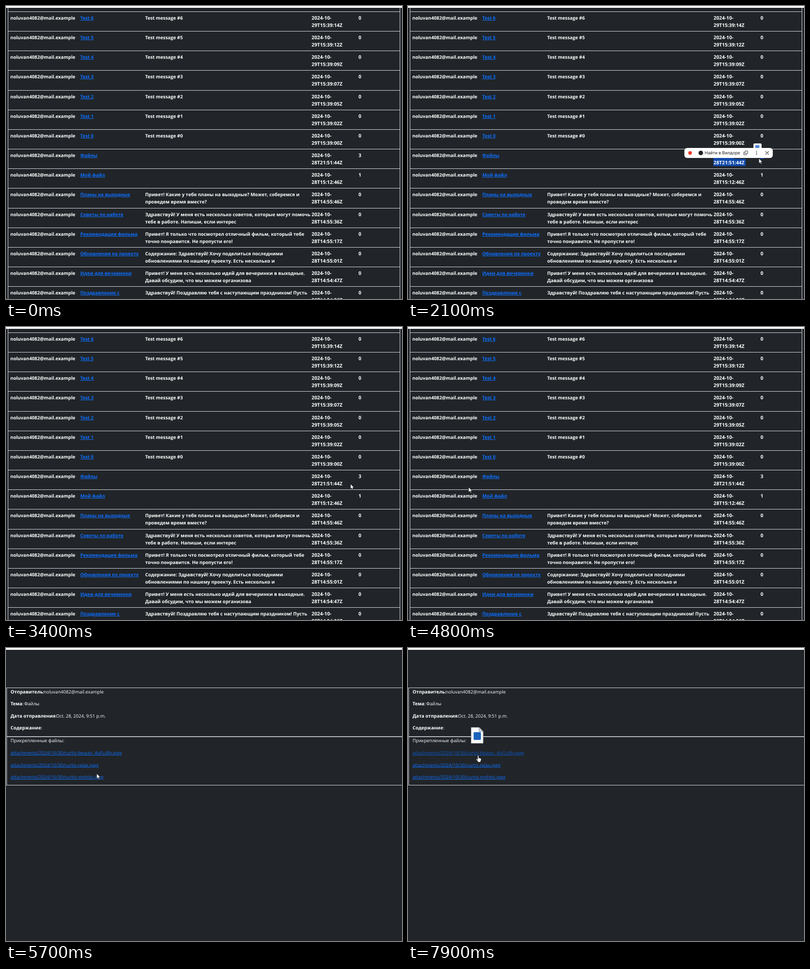
An HTML page for the animation above (8 s loop, 869 px wide and 644 px high).

```html
<!DOCTYPE html>
<html lang="ru">
<head>
<meta charset="utf-8">
<title>Почта</title>
<style>
html, body { margin: 0; width: 100%; height: 100%; overflow: hidden; background: #212529; }
svg { display: block; width: 869px; height: 644px; }
text { font: 10px "Open Sans", "Noto Sans", sans-serif; fill: #fff; text-rendering: geometricPrecision; white-space: pre; }
.bold { font-weight: 700; font-size: 10.2px; }
.date { font-weight: 700; font-size: 10.75px; }
.link { fill: #0d6efd; text-decoration: underline; }
.link.hover { fill: #0a58ca; }
.menu { font: 9.7px Roboto, "Noto Sans", sans-serif; fill: #222; }
.border { stroke: #dee2e6; fill: none; shape-rendering: crispEdges; }
.icon { stroke: #333; stroke-width: 1.1; fill: none; }
.pointer { fill: #fff; stroke: #111; stroke-width: .8; }
</style>
</head>
<body>
<svg viewBox="0 0 869 644">
  <rect width="869" height="644" fill="#212529"/>
  <g id="list">
    <g id="selection" fill="#0d47a8">
      <path d="M670 320h46v16h-46zM670 336h71v16h-71zM773 320h8v16h-8z"/>
    </g>
  </g>
  <g id="letter"></g>
  <rect width="869" height="4" fill="#fff"/>
  <rect id="progress" y="4" height="2" fill="#f6d32d"/>
  <g id="translate">
    <rect x="758" y="302" width="18" height="18" rx="3" fill="#f4f6f8"/>
    <rect x="762" y="306" width="9" height="9" fill="#5289d6"/>
  </g>
  <g id="popup">
    <rect x="606.5" y="312" width="194" height="22" rx="6" fill="#fff"/>
    <circle cx="619" cy="323" r="4" fill="#f33b28"/>
    <circle cx="642.5" cy="323" r="5" fill="#222"/>
    <text class="menu" x="651" y="326.3">Найти в Вилдоре</text>
    <g class="icon">
      <rect x="739.5" y="318.5" width="6" height="6" rx="1.5"/>
      <path d="M738 321h-1v6h6v-1M784.5 319.5l7 7M791.5 319.5l-7 7"/>
    </g>
    <path d="M764 318.5h1.8v1.8h-1.8zM764 322h1.8v1.8h-1.8zM764 325.500h1.8v1.8h-1.8z" fill="#333"/>
  </g>
  <g id="file">
    <path d="M.5 .5H18L27 9.500V35.500H.5z" fill="#f8f9fa" stroke="#8a8d91"/>
    <path d="M18 .5V9.500H27z" fill="#d5d8dc" stroke="#8a8d91"/>
    <rect x="6" y="11" width="16" height="17" rx="2" fill="#1c62bd"/>
  </g>
  <path id="arrow" class="pointer" d="M0 0V11.200L2.700 8.700 4.400 12.600 6.200 11.800 4.500 8H8z"/>
  <path id="hand" class="pointer" d="M-1.200 1.500Q-1.200 0 0 0T1.200 1.500V5.500L5.200 6.400Q6.700 6.800 6.600 8.400L6 11.700Q5.700 12.900 5 13.500V15H-.5V13.800L-4.100 9.200Q-4.700 8.200-3.800 7.700-3 7.300-2.300 8.100L-1.200 9.300z"/>
</svg>
<script>
const $ = id => document.getElementById(id);
const sender = 'noluvan4082@mail.example';

function add(parent, tag, attrs, content = '') {
  const el = document.createElementNS('http://www.w3.org/2000/svg', tag);
  for (const name in attrs) el.setAttribute(name, attrs[name]);
  el.textContent = content;
  return parent.appendChild(el);
}
const write = (parent, x, y, content, cls = '') => add(parent, 'text', { x, y, class: cls }, content);
const line = (parent, d) => add(parent, 'path', { d, class: 'border' });

// Inbox: subject, message lines, day, time, attachment count
const rows = [];
const seconds = [0, 2, 5, 7, 9, 12, 14];
for (let n = 6; n >= 0; n--)
  rows.push([`Test ${n}`, [`Test message #${n}`], 29, `15:39:${String(seconds[n]).padStart(2, '0')}`, 0]);
rows.push(
  ['Файлы', [], 28, '21:51:44', 3],
  ['Мой файл', [], 28, '15:12:46', 1],
  ['Планы на выходные', ['Привет! Какие у тебя планы на выходные? Может, соберемся и', 'проведем время вместе?'], 28, '14:55:46', 0],
  ['Советы по работе', ['Здравствуй! У меня есть несколько советов, которые могут помочь', 'тебе в работе. Напиши, если интерес'], 28, '14:55:36', 0],
  ['Рекомендация фильма', ['Привет! Я только что посмотрел отличный фильм, который тебе', 'точно понравится. Не пропусти его!'], 28, '14:55:17', 0],
  ['Обновления по проекту', ['Содержание: Здравствуй! Хочу поделиться последними', 'обновлениями по нашему проекту. Есть несколько и'], 28, '14:55:01', 0],
  ['Идеи для вечеринки', ['Привет! У меня есть несколько идей для вечеринки в выходные.', 'Давай обсудим, что мы можем организова'], 28, '14:54:47', 0],
  ['Поздравление с', ['Здравствуй! Поздравляю тебя с наступающим праздником! Пусть'], 28, '14:54:36', 0]
);

const list = $('list'), letter = $('letter');
const links = [];

line(list, 'M4.5 4V644M864.5 4V644');
rows.forEach(([subject, message, day, time, count], i) => {
  const top = Math.round(12 + 43.15 * i), y = top + 18;
  line(list, `M4 ${top + .5}H865`);
  write(list, 9.5, y, sender, 'bold');
  const el = write(list, 163, y, subject, 'bold link');
  if (subject === 'Файлы') links.push({ el, view: list, left: 163, right: 199, top: 320, bottom: 336 });
  message.forEach((part, k) => write(list, 305.5, y + 16 * k, part, 'bold'));
  write(list, 670.5, y, '2024-10-', 'date');
  write(list, 670.5, y + 16, `${day}T${time}Z`, 'date');
  write(list, 773.5, y, count, 'date');
});

// Opened letter
line(letter, 'M870 87.5H1.5V301.500H870M1 194.500H870');
add(letter, 'path', { d: 'M1 195.300H870', class: 'border', 'stroke-opacity': .6 });
[
  ['Отправитель', 82.5, sender],
  ['Тема', 40, 'Файлы'],
  ['Дата отправления', 110, 'Oct. 28, 2024, 9:51 p.m.'],
  ['Содержание', 80, '']
].forEach(([label, x, value], i) => {
  const y = 99.7 + 26.5 * i;
  const el = write(letter, 10, y, '');
  add(el, 'tspan', { class: 'bold' }, label);
  add(el, 'tspan', {}, ':');
  write(letter, x, y, value);
});
write(letter, 10, 207.3, 'Прикрепленные файлы:');
[['beauty_4uFLsRy', 257], ['relax', 204], ['mohito', 216]].forEach(([name, right], i) => {
  const y = 234 + 26.6 * i;
  const el = write(letter, 10, y, `attachments/2024/10/30/curtis-${name}.jpeg`, 'link');
  links.push({ el, view: letter, left: 10, right, top: y - 11, bottom: y + 5 });
});

// Pointer path: time, x, y
const path = [
  [700, 154, 346], [800, 506, 440], [1100, 823, 357], [1500, 788, 338], [1600, 788, 338],
  [1800, 776, 337], [1900, 776, 337], [2100, 770, 335], [2300, 770, 335], [2700, 677, 344],
  [2800, 677, 344], [3200, 861, 297], [3300, 861, 297], [3400, 756, 345], [3900, 180, 338],
  [4000, 180, 338], [4100, 180, 330], [4300, 182, 327], [4400, 182, 327], [4800, 133, 352],
  [5000, 133, 352], [5100, 150, 368], [5200, 150, 368], [5300, 158, 373], [5700, 199, 276],
  [6100, 147, 233], [6200, 146, 232], [6300, 146, 232], [6600, 145, 231], [7400, 145, 231],
  [7600, 148, 234], [7700, 148, 234], [7900, 154, 236]
];
function pointerAt(t) {
  const i = path.findIndex(p => p[0] >= t);
  if (i < 1) return path[0].slice(1);
  const [t0, x0, y0] = path[i - 1], [t1, x1, y1] = path[i];
  const k = (t - t0) / (t1 - t0);
  return [x0 + (x1 - x0) * k, y0 + (y1 - y0) * k];
}

const show = (el, on) => { el.style.display = on ? '' : 'none'; };
const within = (t, from, to) => t >= from && t < to;
const place = (el, x, y) => el.setAttribute('transform', `translate(${Math.round(x)} ${Math.round(y)})`);

function progressAt(t) {
  if (within(t, 4900, 5300)) return t < 5000 ? 549 : 869;
  if (within(t, 7100, 7400)) return Math.min(869, 549 + (t - 7100) * 1.6);
  return 0;
}

function draw(t) {
  const view = t < 5000 ? list : letter;
  const [x, y] = pointerAt(t);
  const visible = t >= 700 && !within(t, 900, 1100);
  let overLink = false;
  for (const link of links) {
    const hover = visible && link.view === view &&
      x >= link.left && x <= link.right && y >= link.top && y <= link.bottom;
    link.el.classList.toggle('hover', hover);
    overLink ||= hover;
  }
  show(list, view === list);
  show(letter, view === letter);
  show($('selection'), within(t, 1700, 2600));
  show($('popup'), within(t, 2000, 2600));
  show($('translate'), within(t, 2000, 2600));
  show($('file'), t >= 7500);
  place($('file'), x - 16, y - 62);
  $('progress').setAttribute('width', progressAt(t));
  show($('arrow'), visible && !overLink);
  show($('hand'), visible && overLink);
  place($('arrow'), x, y);
  place($('hand'), x, y);
}

function tick() {
  draw(Math.floor(performance.now() % 8000 / 100) * 100);
  requestAnimationFrame(tick);
}
tick();
</script>
</body>
</html>
```
